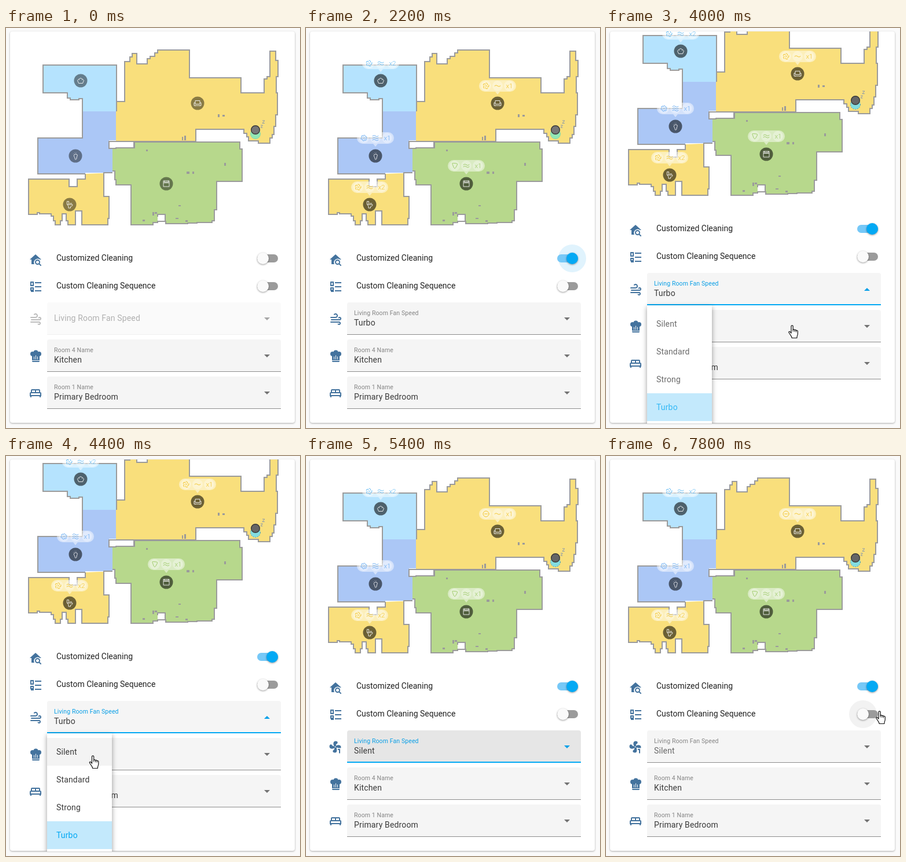
An HTML page that plays this animation: 508 px wide and 691 px high, repeating every 8000 ms.

```html
<!DOCTYPE html>
<html lang="en">
<head>
<meta charset="utf-8">
<title>Cleaning card</title>
<style>
html, body { margin: 0; width: 100%; height: 100%; overflow: hidden; background: #fafafa; }
svg { display: block; width: 508px; height: 691px; font-family: Roboto, sans-serif; font-size: 14px; }
.card { fill: #fff; filter: drop-shadow(0 1px 1.5px rgba(0,0,0,.32)); }
.wall { stroke: #9b9b9b; stroke-width: 2; }
.val { letter-spacing: .15px; fill: #3a3a3a; }
.lab { font-size: 10.5px; letter-spacing: .11px; fill: #858585; }
.ico { fill: #44739e; }
.line { fill: none; stroke: #44739e; stroke-width: 2; }
.white { fill: none; stroke: #fff; stroke-opacity: .85; stroke-linejoin: round; }
.bub { fill: none; stroke-linecap: round; stroke-linejoin: round; }
.bub text { font-size: 11.5px; font-weight: 300; stroke: none; text-anchor: middle; }
.pill { fill: #fff; stroke: none; }
.thumb { filter: drop-shadow(0 1px 1.5px rgba(0,0,0,.4)); }
.menu { fill: #fff; filter: drop-shadow(0 3px 4px rgba(0,0,0,.4)); }
</style>
</head>
<body>
<svg id="stage" viewBox="0 0 508 691"></svg>
<script>
const LOOP = 8000;
const at = (x, y, body, extra = '') => `<g transform="translate(${x} ${y})" ${extra}>${body}</g>`;
const text = (x, y, s, cls, extra = '') => `<text x="${x}" y="${y}" class="${cls}" ${extra}>${s}</text>`;
const path = (d, cls, extra = '') => `<path d="${d}" class="${cls}" ${extra}/>`;
const rect = (x, y, w, h, fill, extra = '') => `<rect x="${x}" y="${y}" width="${w}" height="${h}" fill="${fill}" ${extra}/>`;
const disc = (x, y, r, extra = '') => `<circle cx="${x}" cy="${y}" r="${r}" ${extra}/>`;
const spin = (n, body) => Array.from({ length: n }, (_, i) => `<g transform="rotate(${i * 360 / n})">${body}</g>`).join('');

// A right-angled outline: from x, y on, next x and next y take turns
const room = (fill, x, y, turns, cls = 'wall') =>
  path(`M ${x} ${y} ` + turns.map((v, i) => (i % 2 ? 'V ' : 'H ') + v).join(' '), cls, `fill="${fill}"`);

const rooms =
  room('#abc7f6', 132, 143, [190, 194, 178, 208, 184, 250, 137, 252, 55, 190, 132], '') +
  room('#f9df7c', 190, 127, [205, 58, 214, 50, 218, 44, 226, 62, 244, 53, 249, 49, 257, 43, 262, 38,
    317, 86, 406, 112, 446, 88, 451, 84, 456, 40, 466, 56, 470, 84, 467, 112, 469, 150, 466, 170,
    463, 184, 460, 190, 456, 199, 436, 195, 419, 188, 416, 182, 411, 175, 328, 196, 190]) +
  room('#b5e3fe', 132, 144, [132, 122, 126, 124, 111, 121, 106, 112, 64, 64, 191, 144]) +
  room('none', 132, 122, [132, 190, 55, 252, 137]) +
  room('#f9df7c', 137, 252, [137, 261, 123, 274, 109, 261, 39, 322, 54, 319, 58, 321, 78, 325, 82, 333,
    85, 340, 94, 333, 97, 321, 104, 333, 107, 340, 120, 316, 131, 340, 176, 329, 178, 291, 169, 250, 184]) +
  room('#b7d88c', 184, 247, [188, 262, 190, 271, 216, 340, 254, 336, 262, 334, 276, 338, 314, 337, 330, 336,
    356, 333, 360, 314, 364, 265, 408, 209, 404, 197, 222, 207, 184]) +
  room('#fff', 178, 196, [221, 207, 190, 208, 178, 195]) +
  rect(262, 322, 13, 11, '#fff') +
  room('none', 262, 326, [262, 322, 275, 334]);

const specks = [[242, 210, 3, 3], [312, 248, 5, 4], [322, 248, 3, 4], [377, 233, 3, 5], [298, 306, 4, 2],
  [253, 318, 3, 6], [236, 331, 4, 3], [257, 318, 4, 3], [293, 328, 5, 2], [310, 332, 4, 3], [366, 149, 3, 5],
  [374, 150, 4, 3], [304, 188, 2, 6], [308, 186, 3, 8]]
  .map(([x, y, w, h]) => rect(x, y, w, h, '#9b9b9b')).join('');

const glyphs = {
  pot: 'M -3.5 4.5 H 3.5 L 5.5 -.5 L 3.5 -2.5 L 0 -4.5 L -3.5 -2.5 L -5.5 -.5 Z M -3.5 -2.5 l 1.5 1.5 M 3.5 -2.5 l -1.5 1.5',
  foot: 'M -2 -2 C -4 0 -1 2 -1 4.5 C -1 7 2 6.5 2 4 C 2 1 4 0 3 -2 C 2 -3.5 -1 -3.5 -2 -2 Z M -3.2 -4 v .5 M -1 -5.5 v .5 M 1.2 -5.7 v .5',
  sofa: 'M -4 -1 V -4.5 H 4 V -1 M -6 -1 H -4 V 1.5 H 4 V -1 H 6 V 4 H -6 Z M -4 4 v 1 M 4 4 v 1',
  bed: 'M -5 -5 H 5 V 5 H -5 Z M -5 -1.5 H 5 M -3.5 -5 v 2 h 7 v -2',
  toilet: 'M -4.5 -5.5 h 3 V 0 h -3 Z M -1.5 0 H 5 C 5 3 2.5 3.5 1.5 3.5 V 6 H -2 V 3 L -4 0 M 0 -2 h 4'
};
const star = n => spin(n, path('M 0 -5 Q 3.3 -5 2.6 -1.8', '')) + disc(0, 0, 1.2, 'stroke-width=".5"');
const waves = n => Array.from({ length: n }, (_, i) =>
  path(`M -5 ${(i - (n - 1) / 2) * 3.4} q 2.5 -2.4 5 0 t 5 0`, '')).join('');
const lobes = path('M -4 -3 Q -5 -5 -2.5 -4.5 L 3 -4 Q 6 -3.5 4 -1 L 1.5 3.5 Q 0 6 -1.5 3.5 Z', '');
const quiet = disc(0, 0, 5) + path('M -2.5 0 h 5', '');

// icon position, glyph, bubble offset, bubble colour and contents
const marks = [
  [129, 91, 'pot', -30, '#65bcf4', star(5), 2, 'x2'],
  [120, 221, 'foot', -31, '#6caef2', star(6), 3, 'x1'],
  [331, 130, 'sofa', -30, '#f2c62f', `<g id="turbo">${star(5)}</g><g id="quiet">${quiet}</g>`, 1, 'x1'],
  [277, 269, 'bed', -31, '#9fcb6c', lobes, 2, 'x1'],
  [110, 305, 'toilet', -30, '#f2c62f', star(5), 2, 'x2']
];
const spots = marks.map(([x, y, g]) =>
  at(x, y, disc(0, 0, 11.5, 'class="spot"') + path(glyphs[g], 'white'))).join('');
const pill = path('M -22 -10 H 22 A 10 10 0 0 1 22 10 H 4 L 0 15 L -4 10 H -22 A 10 10 0 0 1 -22 -10 Z', 'pill', 'opacity=".48"') +
  [-20, 0, 20].map(x => disc(x, 0, 9, 'class="pill" opacity=".3"')).join('');
const bubbles = marks.map(([x, y, , dy, col, fan, n, times]) => at(x, y + dy,
  pill + at(-20, 0, fan) + waves(n) + text(20.5, 4.3, times, '', `fill="${col}"`),
  `class="bub" stroke="${col}"`)).join('');

const robot =
  disc(431, 183, 8.5, 'id="dock"') +
  disc(431, 176, 7.3, 'id="bot" stroke="#383838" stroke-width="1.4"') +
  path('M 443 160 h 4 l -4 4.5 h 4 M 440 168 h 3.5 l -3.5 4 h 3.5', '', 'fill="none" stroke="#8e9ba8"');

// Icons on a 24 unit grid
const house = path('M 5 20 V 12 H 2 L 12 3 L 22 12 H 19.8 A 6.5 6.5 0 0 0 10 20 Z', 'ico') +
  disc(15.5, 16.5, 3.5, 'class="line"') + path('M 18 19 l 3.6 3.6', 'line');
const order = path('M 4 4 h 4 v 6 h -4 Z M 8 18 h -4 v -4 h 4 v 6 h -4 M 11 5 h 11 M 11 12 h 11 M 11 19 h 11', 'line');
const wind = path('M 4 9 H 12 A 3 3 0 1 0 9.9 3.9 M 5 13 H 19 A 2 2 0 1 0 17.6 9.6 M 4 17 H 18 A 2 2 0 1 1 16.6 20.4',
  'line', 'id="wind" stroke-linecap="round"');
const blade = path('M .5 -10 C 5 -10 5 -6.5 2.7 -5.3 Q 1.5 -4.6 1.1 -2.8 L 0 -1.5 L -2.4 -2.3 C -4 -6 -3 -10 .5 -10 Z', 'ico');
const fan = '<g id="fan">' + at(11.5, 11.5, spin(4, blade) + disc(0, 0, 2.8, 'class="ico"') + disc(0, 0, 1.1, 'fill="#fff"')) +
  rect(14.5, 13.5, 8.5, 9.5, '#fff') + path('M 16 16 h 3 v 6.5', 'line') + '</g>';
const slit = (x, y) => rect(x, y, 1, 17.5 - y, '#fff');
const chef = '<g class="ico">' + disc(7, 8, 4) + disc(12.5, 5.5, 4) + disc(18, 8, 4) + '<path d="M 6 8 h 13 v 11 h -13 Z M 6 20 h 13 v 1 l -1 1 h -11 l -1 -1 Z"/></g>' +
  slit(9, 12.5) + slit(12, 10.5) + slit(15, 12.5);
const bed = path('M 5 11 V 7 Q 5 6 6 6 H 18 Q 19 6 19 7 V 11 M 12 6 v 5 M 3 16 v -4 q 0 -1 1 -1 h 16 q 1 0 1 1 v 4 Z M 4 16 v 3 M 20 16 v 3', 'line');

const toggle = (y, id) => disc(444, y, 24, `id="halo${id}"`) +
  rect(434, y - 7, 36, 14, '#9b9b9b', `id="track${id}" rx="7"`) +
  disc(444, y, 10, `id="thumb${id}" class="thumb"`);
const box = y => `M 71 ${y + 56} v -52 q 0 -4 4 -4 h 396 q 4 0 4 4 v 52 Z`;
const arrow = 'M -5 -2.5 H 5 L 0 2.5 Z';
const select = (y, label, value) => path(box(y), '', 'fill="#f5f5f5"') +
  path(`M 71 ${y + 55.5} h 404`, '', 'stroke="#8c8c8c"') +
  text(83, y + 22, label, 'lab') + text(83, y + 40, value, 'val') +
  at(451, y + 28.5, path(arrow, '', 'fill="#737373"'));

const fanField = path(box(474), '', 'id="bg"') + path('M 71 529.5 h 404', '', 'id="rule"') +
  path('', '', 'id="focus" stroke="#03a9f4" stroke-width="2"') +
  text(83, 506, 'Living Room Fan Speed', 'val', 'id="idle" style="fill:#b0b0b0"') +
  text(83, 496, 'Living Room Fan Speed', 'lab', 'id="label"') +
  text(83, 514, '', 'val', 'id="value"') + path(arrow, '', 'id="arrow"');

const menu = '<g id="menu">' + rect(71, 479, 112, 221, '#fff', 'class="menu"') +
  rect(71, 487, 112, 48, '#f3f3f3', 'id="hover"') + rect(71, 631, 112, 48, '#c3e9fc') + '<g id="items">' +
  ['Silent', 'Standard', 'Strong', 'Turbo'].map((s, i) =>
    text(87, 516 + 48 * i, s, 'val', i === 3 ? 'style="fill:#03a9f4"' : '')).join('') + '</g></g>';

const hand = '<g id="hand" stroke="#111" stroke-linejoin="round">' +
  path('M 5 14 V 2.3 C 5 .3 8.2 .3 8.2 2.3 V 8.5 Q 9.6 6.5 11 8.8 Q 12.5 7.5 13.6 9.6 Q 15.5 8.8 16.3 10.8 V 15 ' +
    'C 16.3 18 14.8 18.5 14.8 22.5 H 6.2 C 6 19 3.5 17.5 1.2 13.5 C 0 11.8 2 10.6 3.2 11.8 Z', '', 'fill="#fff" stroke-width="1.2"') +
  path('M 8.2 8 v 3.5 M 11 9 v 3 M 13.6 10 v 2.5', '') + '</g>';

const svg = document.getElementById('stage');
svg.innerHTML = '<clipPath id="clip"><rect x="7" y="6" width="492" height="677" rx="4"/></clipPath>' +
  rect(7, 6, 492, 676, '#fff', 'rx="4" class="card"') + '<g clip-path="url(#clip)"><g id="page">' +
  rooms + specks + robot + spots + `<g id="bubbles">${bubbles}</g>` +
  at(39, 388, house) + text(87, 402, 'Customized Cleaning', '', 'fill="#212121"') + toggle(398, 'A') +
  at(39, 435, order) + text(87, 450, 'Custom Cleaning Sequence', '', 'fill="#212121"') + toggle(446, 'B') +
  at(39, 491, wind + fan) + fanField +
  at(39, 555, chef) + select(538, 'Room 4 Name', 'Kitchen') +
  at(39, 619, bed) + select(602, 'Room 1 Name', 'Primary Bedroom') +
  '</g>' + menu + '</g>' + hand;

const el = {};
svg.querySelectorAll('[id]').forEach(n => { el[n.id] = n; });
const show = (id, on) => el[id].setAttribute('visibility', on ? 'inherit' : 'hidden');
const set = (id, attrs) => Object.entries(attrs).forEach(([k, v]) => el[id].setAttribute(k, v));

// Each step changes part of the state
const steps = [
  [0, { hand: null, on: false, haloA: false, haloB: false, lit: false, bubbles: false, value: '', bg: '#fafafa',
    half: 0, blue: false, up: false, scroll: 0, menu: false, hover: false, items: 1, late: false,
    silent: false, quiet: false, ink: '#3a3a3a' }],
  [1400, { hand: [496, 427] }],
  [1600, { hand: [465, 393] }],
  [1800, { on: true, haloA: true, value: 'Turbo', bg: '#f5f5f5' }],
  [2000, { hand: null, lit: true }],
  [2200, { bubbles: true }],
  [3400, { hand: [439, 519], bg: '#ececec' }],
  [3600, { hand: [406, 508] }],
  [3800, { haloA: false, bg: '#dcdcdc', blue: true, half: 169 }],
  [4000, { hand: [315, 513], scroll: -51, menu: true, items: .75, up: true, half: 202, bg: '#f5f5f5', late: true }],
  [4200, { hand: [176, 524], items: 1 }],
  [4400, { hand: [143.5, 517], hover: true }],
  [4800, { scroll: 0, menu: false, value: 'Silent', silent: true, bg: '#e6e6e6' }],
  [5000, { hand: [171, 517], up: false }],
  [5200, { hand: [469, 522] }],
  [5400, { hand: null, quiet: true }],
  [6000, { bg: '#f5f5f5', blue: false, half: 0, ink: '#686868' }],
  [7800, { hand: [466, 440], haloB: true }]
];

function paintToggle(id, on, halo) {
  const cx = on ? 460 : 444;
  set('track' + id, { fill: on ? '#76c8f7' : '#9b9b9b' });
  set('thumb' + id, { cx, fill: on ? '#03a9f4' : '#fafafa' });
  set('halo' + id, { cx, fill: on ? '#e0f3fd' : '#f2f2f2' });
  show('halo' + id, halo);
}

function draw(t) {
  const s = Object.assign({}, ...steps.filter(([start]) => start <= t).map(p => p[1]));
  const open = s.value !== '';
  show('hand', s.hand);
  if (s.hand) set('hand', { transform: `translate(${s.hand})` });
  set('page', { transform: `translate(0 ${s.scroll})` });
  paintToggle('A', s.on, s.haloA);
  paintToggle('B', false, s.haloB);
  show('bubbles', s.bubbles);
  show('turbo', !s.quiet);
  show('quiet', s.quiet);
  svg.querySelectorAll('.spot').forEach(d => d.setAttribute('fill-opacity', s.bubbles ? .57 : .45));
  set('dock', { fill: s.late ? '#83dde0' : '#92e8b5', stroke: s.late ? '#4b98a8' : '#86d9a6',
    'stroke-dasharray': s.late ? '2 2' : 'none' });
  set('bot', { fill: s.late ? '#666' : '#777' });
  show('wind', !s.silent);
  show('fan', s.silent);
  el.wind.style.stroke = s.lit ? '#44739e' : '#bdbdbd';
  set('bg', { fill: s.bg });
  set('rule', { stroke: !open ? '#f0f0f0' : s.blue ? '#333' : '#8c8c8c' });
  show('focus', s.half);
  set('focus', { d: `M ${273 - s.half} 529 H ${273 + s.half}` });
  show('idle', !open);
  show('label', open);
  el.label.style.fill = s.blue ? '#0a9fe6' : '#858585';
  el.value.textContent = s.value;
  el.value.style.fill = s.ink;
  set('arrow', { transform: `translate(451 502.5) scale(1 ${s.up ? -1 : 1})`,
    fill: s.blue ? '#03a0e8' : open ? '#737373' : '#a6a6a6' });
  show('menu', s.menu);
  show('hover', s.menu && s.hover);
  set('items', { opacity: s.items });
}

const begin = performance.now();
function tick() {
  draw((performance.now() - begin) % LOOP);
  requestAnimationFrame(tick);
}
tick();
</script>
</body>
</html>
```
